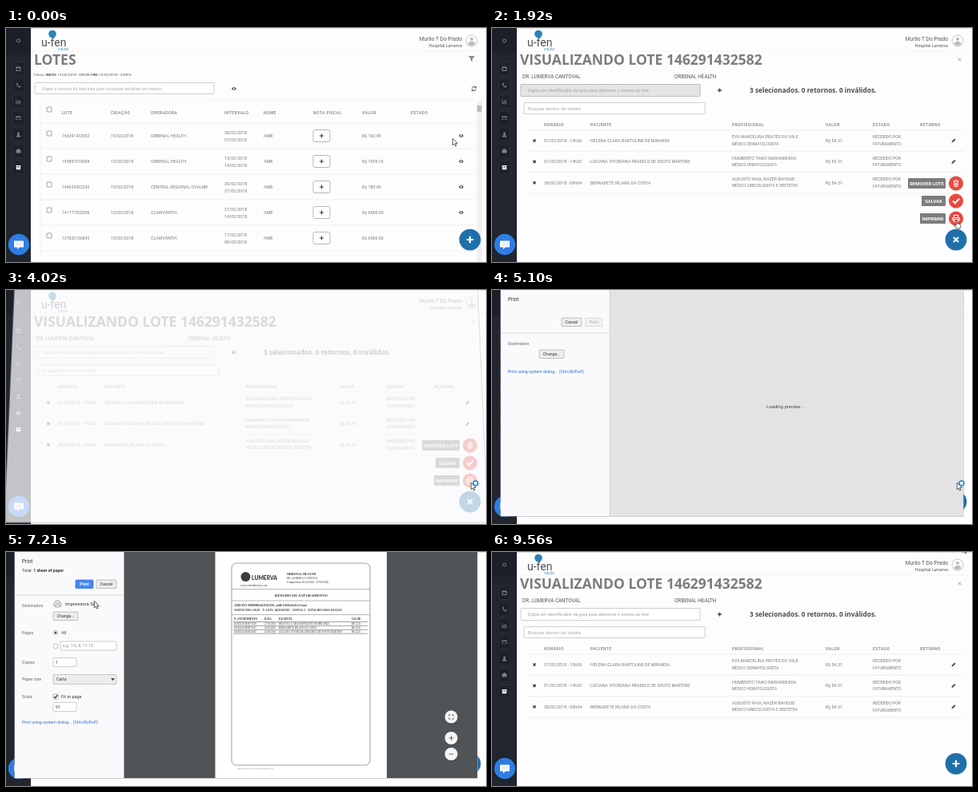
An HTML page for the animation above (9.62 s loop, 600x293 px).

```html
<!DOCTYPE html>
<html lang="pt-BR">
<head>
<meta charset="utf-8">
<title>Lotes</title>
<style>
html, body { margin: 0; width: 100%; height: 100%; overflow: hidden; background: #fefdfe; }
main { position: fixed; inset: 0; overflow: clip; contain: strict; }
svg { position: absolute; left: 0; top: 0; width: 100%; height: 100%; font-family: Roboto, sans-serif; }
.title { font: 700 17.5px "Open Sans", sans-serif; }
.serif { font-family: "Liberation Serif", serif; }
.list, .lote, .dialog, .loading, .ready, .items, .fab, .busy, .hand, .arrow, .cursor, .disabled {
  animation: 9620ms linear infinite;
}
.list { animation-name: list; }
.lote { animation-name: lote; }
.disabled { animation-name: disabled; }
.items { animation-name: items; }
.fab { animation-name: fab; }
.dialog { animation-name: dialog; transform-origin: 50% 0; }
.loading { animation-name: loading; }
.ready { animation-name: ready; }
.cursor { animation-name: cursor; }
.arrow { animation-name: arrow; }
.hand { animation-name: hand; }
.busy { animation-name: busy; }

@keyframes list { 0%, 9.3% { opacity: 1 } 9.31%, 100% { opacity: 0 } }
@keyframes lote { 0%, 9.3% { opacity: 0 } 9.31%, 100% { opacity: 1 } }
@keyframes disabled { 0%, 32% { opacity: 1 } 32.01%, 100% { opacity: 0 } }
@keyframes items {
  0%, 14.3% { opacity: 0; transform: translateY(25px) }
  16.5%, 66% { opacity: 1; transform: none }
  68%, 100% { opacity: 0; transform: translateY(25px) }
}
@keyframes fab { 0%, 14.3% { transform: none } 16.5%, 66% { transform: rotate(45deg) } 68%, 100% { transform: none } }
@keyframes dialog {
  0%, 40.9% { opacity: 0; transform: translateY(-6px) perspective(220px) rotateX(2.5deg) }
  41.79% { opacity: .75 }
  42.5% { opacity: 1 }
  44.5%, 83% { opacity: 1; transform: translateY(0px) perspective(220px) rotateX(0deg) }
  84.3% { opacity: 1; transform: translateY(-6px) perspective(220px) rotateX(2.5deg) }
  86.3%, 100% { opacity: 0; transform: translateY(-6px) perspective(220px) rotateX(2.5deg) }
}
@keyframes loading { 0%, 42.7% { opacity: 0 } 43%, 65.5% { opacity: 1 } 65.51%, 100% { opacity: 0 } }
@keyframes ready { 0%, 65.5% { opacity: 0 } 65.51%, 100% { opacity: 1 } }
@keyframes cursor {
  0% { transform: translate(558px, 138px); animation-timing-function: ease-in-out }
  3%, 9% { transform: translate(568px, 134px); animation-timing-function: ease-in-out }
  13.8%, 16% { transform: translate(580px, 262px); animation-timing-function: ease-in-out }
  18.5%, 65.5% { transform: translate(581px, 241px); animation-timing-function: ease-in-out }
  74%, 76.5% { transform: translate(110px, 61px); animation-timing-function: ease-in-out }
  81%, 87.5% { transform: translate(130px, 39px); animation-timing-function: ease-in-out }
  99.2%, 100% { transform: translate(588px, -8px) }
}
@keyframes hand {
  0%, 2.8% { opacity: 0 } 2.81%, 9.3% { opacity: 1 } 9.31%, 13.2% { opacity: 0 }
  13.21%, 24% { opacity: 1 } 24.01%, 100% { opacity: 0 }
}
@keyframes arrow {
  0%, 2.8% { opacity: 1 } 2.81%, 9.3% { opacity: 0 } 9.31%, 13.2% { opacity: 1 }
  13.21%, 24% { opacity: 0 } 24.01%, 100% { opacity: 1 }
}
@keyframes busy { 0%, 24% { opacity: 0 } 24.01%, 65.5% { opacity: 1 } 65.51%, 100% { opacity: 0 } }
</style>
</head>
<body>
<main></main>
<script>
const GREY = '#77787b', DARK = '#444', BLUE = '#1f70aa', RED = '#e9493f', PANEL = '#faf9fb';

// Text is placed by its left edge and vertical middle.
const text = (x, y, s, size = 5.3, fill = GREY, extra = '') =>
  `<text x="${x}" y="${y + size * .36}" font-size="${size}" fill="${fill}" ${extra}>${s}</text>`;
const bold = (x, y, s, size, fill, extra = '') => text(x, y, s, size, fill, 'font-weight="700" ' + extra);
const rect = (x, y, w, h, fill = 'none', extra = '') =>
  `<rect x="${x}" y="${y}" width="${w}" height="${h}" fill="${fill}" ${extra}/>`;
const box = (x, y, w, h, fill = '#fff', line = '#aaa', r = 1) =>
  rect(x, y, w, h, fill, `stroke="${line}" stroke-width=".7" rx="${r}"`);
const circle = (x, y, r, fill, extra = '') => `<circle cx="${x}" cy="${y}" r="${r}" fill="${fill}" ${extra}/>`;
const line = (d, color, w = .7, extra = '') => `<path d="${d}" fill="none" stroke="${color}" stroke-width="${w}" ${extra}/>`;
const shape = (d, fill) => `<path d="${d}" fill="${fill}" fill-rule="evenodd"/>`;
const at = (x, y, body) => `<g transform="translate(${x} ${y})">${body}</g>`;
const group = (name, ...parts) => `<g class="${name}">${parts.join('')}</g>`;
const layer = (name, ...parts) => `<svg class="${name}" viewBox="0 0 600 293" preserveAspectRatio="none">${parts.join('')}</svg>`;
const rule = (y, x1, x2, color = '#e9e9ea') => line(`M${x1} ${y}H${x2}`, color);
const header = (y, cols) => cols.map(([x, s]) => bold(x, y, s, 5, '#8d8e91', 'letter-spacing=".45"')).join('');

const plus = (size, w, color) => line(`M${-size} 0H${size}M0 ${-size}V${size}`, color, w);
const eye = (x, y) => at(x, y, shape('M-3 0Q0-4 3 0Q0 4-3 0ZM-1.2 0a1.2 1.2 0 1 0 2.4 0a1.2 1.2 0 1 0-2.4 0Z', DARK) + circle(0, 0, .6, DARK));
const pencil = (x, y) => at(x, y, shape('M-2.5 2.5l.5-1.8L1.2-2.5 2.5-1.2-.7 2Z', DARK));
const cross = (x, y, s, color, w) => at(x, y, line(`M${-s} ${-s}L${s} ${s}M${s} ${-s}L${-s} ${s}`, color, w));

function sidebar() {
  const icons = [
    'M-3-2.5H3V3H-3ZM-2-.8V2H2V-.8Z',
    'M-2.5-2.8l1.5 0 .7 1.8-1 .8 1.5 1.6 1-.8 1.6.9-.3 1.4Q-2.4 3-2.5-2.8Z',
    'M-3 3V-3h.7V2.2H3V3ZM-1.6 1.5V-.5h1V1.5ZM0 1.5V-2h1V1.5ZM1.6 1.5V-1h1V1.5Z',
    'M-3-2.3H3V2.3H-3ZM-2.3-.7V1.6H2.3V-.7Z',
    'M-1.4-1.5a1.4 1.4 0 0 1 2.8 0Q1.4 0 .6.5L2.6 1.5V3H-2.6V1.5L-.6.5Q-1.4 0-1.4-1.5Z',
    'M-3-1.6H-1.2V-2.8H1.2V-1.6H3V2.5H-3Z',
    'M-3-2.6H3V-1.2H-3ZM-2.7-.7H2.7V2.7H-2.7ZM-1 0V.7H1V0Z'
  ];
  return rect(0, 0, 31, 293, '#20252e') + rect(0, 0, 31, 31, '#1b2028') +
    circle(15.5, 16, 2, 'none', 'stroke="#777d86" stroke-width="1"') +
    icons.map((d, i) => {
      const y = 51 + i * 20.6;
      return box(8.5, y - 8.5, 14, 17, '#1c2129', '#2e343d') + at(15.5, y, shape(d, i === 6 ? '#fff' : '#7a8089'));
    }).join('') +
    circle(16, 271, 13.2, '#2f7de3') +
    at(16, 271, shape('M-6-4.5H6V3.5H.8L-2 6.2V3.5H-6Z', '#fff') + line('M-3.5-1.7H3.5M-3.5 .7H3.5', '#9cc2f3', .6));
}

function frame() {
  return rect(0, 0, 600, 293, '#fefdfe') + sidebar() +
    rule(.6, 31, 600, '#d5d3d3') + rule(29, 31, 600, '#f1f0f1') +
    circle(58, 7.5, 4.8, '#2d82b8') + text(44, 17.5, 'u-fen', 14, '#4b5055') + text(65, 26.5, 'saúde', 4.8, '#4b9ac4') +
    text(570, 14, 'Murilo T Do Prado', 6.7, '#555', 'text-anchor="end"') +
    text(570, 22.5, 'Hospital Lumerva', 5.3, '#555', 'text-anchor="end"') +
    circle(582, 16, 7, '#fff', 'stroke="#b5b5b5" stroke-width=".8"') +
    circle(582, 13.8, 2.1, '#bbb') + shape('M577.7 20.5Q578 16.8 582 16.8T586.3 20.5Q582 23.4 577.7 20.5Z', '#bbb');
}

const fabBase = circle(580, 265.6, 13.8, '#d8dde2') + circle(580, 265, 13.3, BLUE);
const title = s => `<text class="title" x="35" y="46.3" fill="#7b7c7f">${s}</text>`;

function list() {
  const rows = [
    ['146291432582', 'ORBENAL HEALTH', '28/02/2018', '07/03/2018', '162.99'],
    ['145897078084', 'ORBENAL HEALTH', '15/02/2018', '14/03/2018', '1955.16'],
    ['144635422243', 'CENTRAL REGIONAL OVALME', '20/02/2018', '27/02/2018', '180.00'],
    ['141777202056', 'CLARIVÂNTIA', '27/02/2018', '14/03/2018', '6500.00'],
    ['137832166842', 'CLARIVÂNTIA', '17/02/2018', '08/03/2018', '6500.00']
  ];
  const check = y => box(51, y - 3, 6, 6, '#fff', '#777');
  const body = rows.map(([id, firm, from, to, value], i) => {
    const y = 135 + i * 32;
    return rule(y + 16, 43, 586) + check(y - 3) + text(70, y, id, 5.1) + text(131, y, '15/03/2018') +
      text(181, y, firm) + text(273, y - 4, from) + text(273, y + 4.7, to) + text(322, y, 'AMB') +
      box(384, y - 7.5, 21, 15, '#fff', '#999', 2) + at(394.5, y, plus(2.5, 1.2, DARK)) +
      text(445, y, 'R$ ' + value) + eye(569, y);
  }).join('');
  return group('list', frame(), title('LOTES'),
    text(35, 58, 'Filtros: <tspan font-weight="700">INICIO:</tspan> 13/02/2018 - 00H00; <tspan font-weight="700">FIM:</tspan> 15/03/2018 - 23H59;', 4.4, '#555'),
    shape('M578 35H586L583 38.8V42.3L581 40.8V38.8Z', '#8a8b8e'),
    box(36, 68.5, 224, 14, '#fff', '#bbb'),
    text(45, 75.7, 'Digite o número da lote/lista para visualizar detalhes do mesmo', 5.3, '#aaa'),
    eye(285, 76),
    at(585, 76, line('M-2.5-.4A2.5 2.5 0 0 1 2-1.7M2.5 .4A2.5 2.5 0 0 1-2 1.7M2.4-3V-1.2H.5M-2.4 3V1.2H-.5', DARK, .9)),
    line('M43 293V91H586', '#f0eff0'), check(102),
    header(106, [[70, 'LOTE'], [131, 'CRIAÇÃO'], [181, 'OPERADORA'], [273, 'INTERVALO'], [322, 'NOME'], [384, 'NOTA FISCAL'], [445, 'VALOR'], [506, 'ESTADO']]),
    rule(119, 43, 586), body,
    rect(588.5, 91, 6.5, 202, '#f0f0f0'), rect(589, 97, 5.5, 8, '#bcbcbc'),
    fabBase, at(580, 265, plus(4.3, 2.2, '#fff')));
}

function menuItem(y, label, x, icon) {
  return rect(x, y - 6.5, 567 - x, 13, '#7c7c7e', 'rx="1"') +
    bold((x + 567) / 2, y, label, 5.9, '#fff', 'text-anchor="middle"') +
    circle(580, y + .5, 9.2, '#e3d5d4') + circle(580, y, 9, RED) + at(580, y, icon);
}

function lote() {
  const rows = [
    ['07/03/2018 - 13h36', 'HELENA CLARA BARTOLINE DE MIRANDA', 'EVA MARCELINA PRATES DO VALE', 'DERMATOLOGISTA'],
    ['01/03/2018 - 14h32', 'LUCIANA VITORIANA PRADELO DE SOUTO MARTINS', 'HUMBERTO TAIKO MURANISHIDA', 'HEMATOLOGISTA'],
    ['28/02/2018 - 09h04', 'BERNADETE IRLANA DA COSTA', 'AUGUSTO RAUL NAZER BAHOUD', 'GINECOLOGISTA E OBSTETRA']
  ];
  const body = rows.map(([when, who, doctor, field], i) => {
    const y = 141 + i * 26.4;
    return cross(53, y, 1.6, '#333', 1.3) + text(65, y, when) + text(123, y, who) +
      text(300, y - 4.5, doctor) + text(300, y + 4, 'MÉDICO ' + field, 4.7) + text(417, y, 'R$ 54.31') +
      text(476, y - 4.5, 'RECEBIDO POR', 5.1) + text(476, y + 4, 'FATURAMENTO', 5.1) +
      pencil(577, y) + rule(y + 13.2, 43, 590);
  }).join('');
  const bin = line('M-3.2-2.8H3.2M-1-3.8H1M-2.5-2.5L-2 3.8H2L2.5-2.5M-.7-1V2.5M.7-1V2.5', '#fff', 1);
  const tick = line('M-4 0L-1.2 2.8L4-2.7', '#fff', 2);
  const printer = line('M-2.5-1V-4H2.5V-1M-2.5 2H-4.2V-1H4.2V2H2.5M-2.5 1H2.5V4H-2.5Z', '#fff', 1.1);
  return group('lote', frame(), title('VISUALIZANDO LOTE 146291432582'), cross(584.5, 39.5, 2, '#888', .8),
    text(38, 60.5, 'DR. LUMERVA CANTOVAL', 6.3, '#555'), text(228, 60.5, 'ORBENAL HEALTH', 6.3, '#555'),
    box(36, 70.5, 224, 15, '#fff', '#bbb'),
    group('disabled', box(36, 70.5, 224, 15, '#e5e4e5', '#b5b5b5')),
    text(45, 78, 'Digite um identificador de guia para adicionar o evento ao lote', 5.5, '#a2a2a4'),
    at(284.5, 78, plus(2.6, 1.3, DARK)),
    bold(322, 78, '3 selecionados. 0 retornos. 0 inválidos.', 8.3, '#4c4d50', 'style="font-family:\'Open Sans\',sans-serif"'),
    box(40, 93.5, 226, 14, '#fff', '#bbb'), text(45, 100.5, 'Busque dentro da tabela', 6.1, '#aaa'),
    header(121, [[65, 'HORÁRIO'], [123, 'PACIENTE'], [300, 'PROFISSIONAL'], [417, 'VALOR'], [476, 'ESTADO'], [535, 'RETORNO']]),
    rule(128, 43, 590), body,
    group('items', menuItem(194.5, 'REMOVER LOTE', 520, bin), menuItem(216.5, 'SALVAR', 537, tick), menuItem(238.5, 'IMPRIMIR', 535, printer)),
    fabBase, at(580, 265, group('fab', plus(4.3, 2.2, '#fff'))));
}

const button = (x, y, w, s, fill = '#ededed', color = '#333', edge = '#aaa', weight = 400) =>
  box(x, y, w, 10.5, fill, edge) + text(x + w / 2, y + 5.3, s, 5.2, color, `text-anchor="middle" font-weight="${weight}"`);
const systemLink = y => text(20, y, 'Print using system dialog... (Ctrl+Shift+P)', 5.2, '#2a72c8');

function loadingPanel() {
  return group('loading', rect(147, 0, 442, 283, '#e3e2e4'),
    rule(54, 11, 147, '#d2d2d2'), line('M147.3 0V283', '#c8c8c8'),
    text(20, 11.5, 'Print', 6.4, '#333'), button(87, 35, 25, 'Cancel'), button(117, 35, 21, 'Print', '#f2f2f2', '#aaa', '#d0d0d0'),
    text(20, 67.5, 'Destination', 5.2, '#666'), button(59, 75, 31, 'Change...'), systemLink(102.5),
    text(343, 146, 'Loading preview ...', 5.9, '#444'));
}

function sheet() {
  const rows = [
    ['27/02/2018', 'HELENA CLARA BARTOLINE DE MIRANDA'],
    ['28/02/2018', 'BERNADETE IRLANA DA COSTA'],
    ['01/03/2018', 'LUCIANA VITORIANA PRADELO DE SOUTO MARTINS']
  ];
  const ink = '#333';
  return rect(261.5, 0, 214.5, 283, '#fff') + box(282, 14, 173, 253, 'none', '#777', 6) +
    group('serif',
      circle(299.5, 31, 6, '#3c3c3c'),
      bold(307, 33, 'LUMERVA', 6.8, '#222', 'style="font-family:Lato,sans-serif"'),
      text(293, 41.5, 'www.redelumerva.com', 3.6, ink),
      bold(351, 27.5, 'ORBENAL HEALTH', 3.9, ink), text(351, 33, 'DR. LUMERVA CANTOVAL', 3.2, ink),
      text(351, 37.8, 'Competência: 01/02/2018 - 07/03/2018', 3.3, ink),
      rule(46.5, 282, 455, '#999'), bold(369, 54, 'RESUMO DE FATURAMENTO', 4.7, ink, 'text-anchor="middle"'),
      rule(61, 282, 455, '#999'),
      bold(285, 67.3, 'ARQUIVO: 00000000146291432582_a4d0c7e8f3b2a6d5e1c9.xml', 3.3, ink),
      bold(285, 72.5, 'VERSÃO TISS: 3.03.03 &#160; &#160;Nº LOTE: 146291432582 &#160; &#160;CONTAS: 3 &#160; &#160;TOTAL RECURSO: R$ 162,93', 3.2, ink),
      rule(78.5, 282, 455, '#999'),
      [[285, 'Nº ATENDIMENTO'], [323, 'DATA'], [341, 'PACIENTE'], [432, 'VALOR']].map(([x, s]) => bold(x, 84, s, 3.3, ink)).join(''),
      rows.map(([date, who], i) => {
        const y = 90 + i * 4.9;
        return rule(y - 2.5, 284, 452, '#777') + text(285, y, '100201201600070' + (218 + i * 37), 3.1, ink) +
          text(323, y, date, 3.1, ink) + text(341, y, who, 3.2, ink) + text(432, y, 'R$ 54,31', 3.1, ink);
      }).join(''),
      rule(102.2, 284, 452, '#777'), text(289, 271, 'Impresso em 15/03/2018 por sistema de lotes', 2.5, '#666'));
}

function readyPanel() {
  const label = (y, s) => text(20, y, s, 5.2, '#666');
  const zoom = (y, icon) => circle(556.5, y + .7, 8.4, '#3f4346') + circle(556.5, y, 8, '#f6f6f6') + at(556.5, y, icon);
  const radio = y => circle(62, y, 3, '#fff', 'stroke="#aaa" stroke-width=".7"');
  return group('ready', rect(147.5, 0, 441.5, 283, '#505456'), rule(54, 11, 147, '#d2d2d2'),
    text(20, 11.5, 'Print', 6.4, '#333'),
    text(20, 23.5, 'Total: <tspan font-weight="700">1 sheet of paper</tspan>', 5.2, '#333'),
    button(87, 35, 22, 'Print', '#4787ed', '#fff', '#3071d9', 700), button(113, 35, 25, 'Cancel'),
    label(67.5, 'Destination'),
    at(64.5, 65, line('M-2.5-1V-4H2.5V-1M-2.5 2.5H-4.5V-1H4.5V2.5H2.5M-2.5 1H2.5V4H-2.5Z', '#999', .8)),
    text(74, 65, 'Impressora Sul', 5.9, '#333'), button(59, 75, 31, 'Change...'),
    label(101, 'Pages'), radio(101), circle(62, 101, 1.5, '#444'), text(69, 101, 'All', 5.3, '#333'),
    radio(118), box(68, 112, 70, 11, '#fff', '#bbb'), text(71, 117.5, 'e.g. 1-5, 8, 11-13', 5.2, '#888'),
    label(138, 'Copies'), box(59, 132.5, 29, 11, '#fff', '#bbb'), text(62, 138, '1', 5.2, '#333'),
    label(159.5, 'Paper size'), box(59, 153.5, 79, 12, '#ececec', '#b5b5b5'), text(63, 159.5, 'Carta', 5.2, '#333'),
    shape('M131 158H136L133.5 161.3Z', '#444'),
    label(181, 'Scale'), box(59, 178, 6, 6, '#fff', '#999'), line('M60.2 181L61.7 182.8L64.4 178.8', '#333', 1.2),
    text(69, 181, 'Fit to page', 5.4, '#333'), box(59, 188.5, 29, 11, '#fff', '#bbb'), text(62, 194, '91', 5.2, '#333'),
    systemLink(213), sheet(),
    zoom(206.5, line('M-2.7-1V-2.7H-1M1-2.7H2.7V-1M2.7 1V2.7H1M-1 2.7H-2.7V1', '#555', .9)),
    zoom(233, plus(2.8, .9, '#555')), zoom(253, line('M-2.8 0H2.8', '#555', .9)));
}

const dialog = layer('dialog', rect(10.5, 0, 579, 283.6, '#a9a9ab'), rect(11, 0, 578, 283, PANEL), loadingPanel(), readyPanel());

const pointer = layer('pointer', group('cursor',
  group('arrow', '<path d="M.3 .3V8.8L2.3 7L3.7 10L5 9.4L3.7 6.4H6.3Z" fill="#fff" stroke="#222" stroke-width=".7"/>'),
  group('hand', '<path d="M-.8 .8Q0-.2 .8 .8V4L4 4.7Q5 5 4.8 6.5L4 10H-.3L-3 6.6Q-2.5 5.2-.8 6.5Z" fill="#fff" stroke="#222" stroke-width=".7"/>'),
  group('busy', circle(6, 1, 3, '#d9ecfb', 'stroke="#2b86d3" stroke-width="1.6"'))));

document.querySelector('main').innerHTML = layer('pages', list(), lote()) + dialog + pointer;
</script>
</body>
</html>
```
